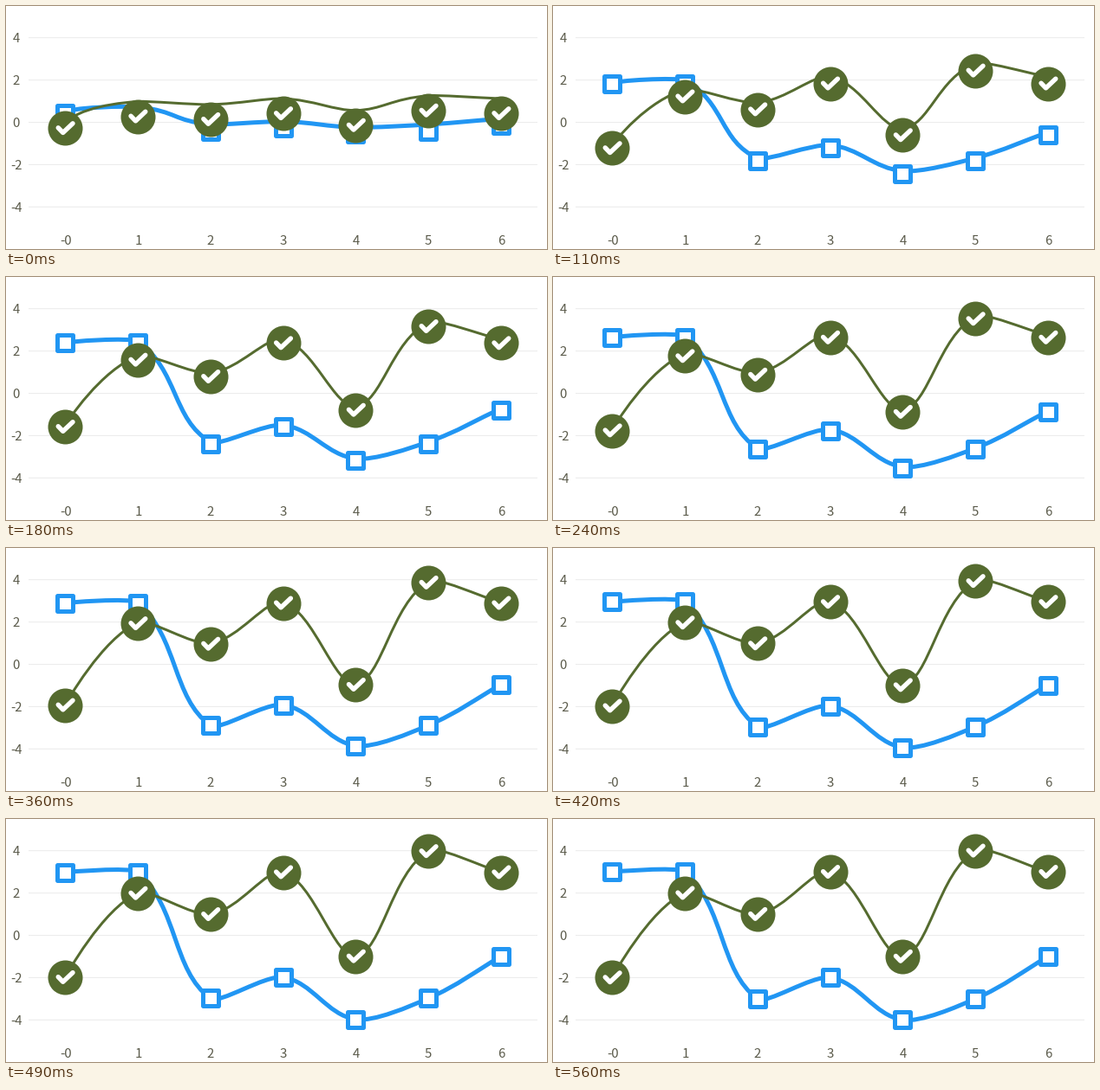
A matplotlib script that plays this animation: 624x281 px, repeating every 1060 ms.

```python
import numpy as np
import matplotlib.pyplot as plt
from matplotlib.animation import FuncAnimation
from matplotlib.markers import MarkerStyle
from matplotlib.patches import PathPatch
from matplotlib.path import Path

W, H, DPI = 624, 281, 100
PX = 72 / DPI                      # points per pixel
LOOP, STEP = 1060, 10              # ms
LEFT, STRIDE = 68.2, 83.8          # pixel column of the first point, spacing
ZERO, UNIT = 134.5, 24.45          # pixel row of value 0, pixels per unit
XS = LEFT + STRIDE * np.arange(7)
SMOOTH = 0.65
BLUE, GREEN, INK = "#2196F3", "#556B2F", "#5b5b4b"

# Moments at which the chart redraws, and the share of the growth reached
TIMES = [0, 110, 180, 240, 310, 360, 420, 490, 560]
GROWTH = [0.139, 0.611, 0.791, 0.88, 0.939, 0.966, 0.984, 0.994, 1.0]

fig = plt.figure(figsize=(W / DPI, H / DPI), dpi=DPI, facecolor="white")
ax = fig.add_axes([0, 0, 1, 1])
ax.set_xlim(0, W)
ax.set_ylim(H, 0)
ax.axis("off")


def label(x, baseline, text):
    ax.text(x, baseline, text, ha="center", va="baseline", color=INK,
            fontsize=15 * PX, family="Noto Sans CJK JP")


def spline(values):
    """Control points of a smooth path, measured in data units."""
    p = np.column_stack([np.arange(len(values)), values]).astype(float)
    pts = [p[0]]
    last = len(p) - 1
    for i in range(last):
        a, b, c, d = p[max(i - 1, 0)], p[i], p[i + 1], p[min(i + 2, last)]
        m1, m2, m3 = (a + b) / 2, (b + c) / 2, (c + d) / 2
        l1, l2, l3 = (np.hypot(*(v - u)) for u, v in ((a, b), (b, c), (c, d)))
        q1 = m1 + (m2 - m1) * l1 / (l1 + l2)
        q2 = m2 + (m3 - m2) * l2 / (l2 + l3)
        out = b if i == 0 else b + (m2 - q1) * SMOOTH
        pts += [out, c + (m2 - q2) * SMOOTH, c]
    return np.array(pts)


class Series:
    def __init__(self, values, color, width, lead, z):
        self.values = np.array(values)
        self.curve = spline(values)
        self.lead = lead           # the line starts this far above the markers
        self.codes = [Path.MOVETO] + [Path.CURVE4] * (len(self.curve) - 1)
        self.line = PathPatch(Path(self.curve, self.codes), fill=False,
                              ec=color, lw=width * PX, capstyle="butt",
                              joinstyle="round", zorder=z)
        ax.add_patch(self.line)

    def grow(self, s):
        x = LEFT + STRIDE * self.curve[:, 0]
        y = ZERO - s * UNIT * self.curve[:, 1]
        y[1:] -= self.lead * (1 - s)
        self.line.set_path(Path(np.column_stack([x, y]), self.codes))
        return ZERO - s * UNIT * self.values


for v in (4, 2, 0, -2, -4):
    y = ZERO - UNIT * v
    ax.plot([26, 613], [y, y], color="#ebebeb", lw=PX, zorder=1,
            solid_capstyle="butt", snap=False)
    label(11.5, y + 5.3, str(v))
for i, x in enumerate(XS):
    label(x + (1.2 if i < 2 else 0), 275.6, str(i) if i else "-0")

blue = Series([3, 3, -3, -2, -4, -3, -1], BLUE, 5, 9, 2)
green = Series([-2, 2, 1, 3, -1, 4, 3], GREEN, 3, 20, 4)

squares, = ax.plot([], [], ls="none", ms=18 * PX, mfc="white", mec=BLUE,
                   mew=5 * PX, zorder=3, snap=False,
                   marker=MarkerStyle("s", joinstyle="round"))
discs, = ax.plot([], [], ls="none", marker="o", ms=40 * PX, mfc=GREEN,
                 mew=0, zorder=5, snap=False)
ticks, = ax.plot([], [], color="white", lw=5.4 * PX, zorder=6,
                 solid_capstyle="round", solid_joinstyle="round")
TICK = np.array([[-8, -0.5], [-2.5, 5.2], [8.8, -5.5], [np.nan, np.nan]])


def draw(frame):
    t = frame * STEP
    s = GROWTH[np.searchsorted(TIMES, t, side="right") - 1]
    squares.set_data(XS, blue.grow(s))
    ys = green.grow(s)
    discs.set_data(XS, ys)
    marks = np.concatenate([TICK + c for c in zip(XS, ys)])
    ticks.set_data(marks[:, 0], marks[:, 1])
    return blue.line, green.line, squares, discs, ticks


anim = FuncAnimation(fig, draw, frames=LOOP // STEP, interval=STEP,
                     repeat=True, repeat_delay=0)
plt.show()
```
